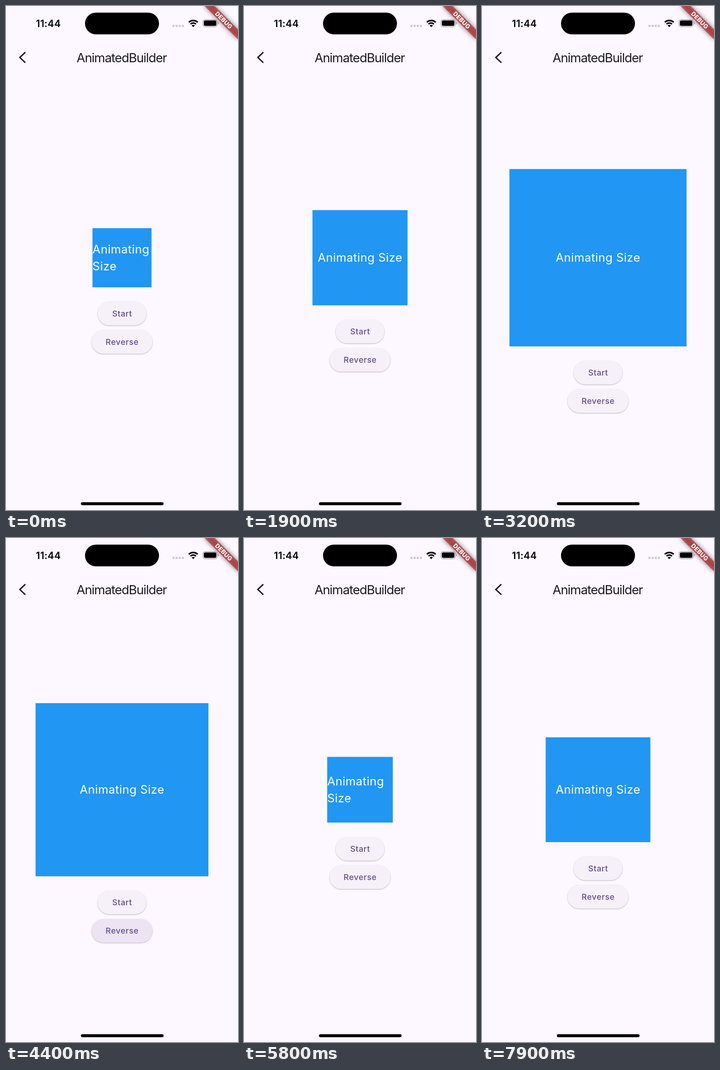
An HTML page for the animation above (8000 ms loop, 508 px wide and 1102 px high).

```html
<!DOCTYPE html>
<html lang="en">
<head>
<meta charset="utf-8">
<title>Animated size</title>
<style>
  html, body { margin: 0; width: 100%; height: 100%; overflow: hidden; background: #fdf7ff; }
  svg { display: block; width: 100vw; height: 100vh; }
  text { font-family: Inter, Roboto, sans-serif; font-optical-sizing: none; text-anchor: middle; }
  .title { font-size: 27.6px; letter-spacing: -1.15px; fill: #1d1b20; }
  .clock { font-size: 21.4px; font-weight: 600; letter-spacing: .2px; }
  .label { font-size: 25.4px; letter-spacing: .5px; fill: #fff; }
  .label.left { text-anchor: start; }
  .button text { font-size: 17.7px; font-weight: 500; letter-spacing: .6px; fill: #5f4e8c; }
  .face { fill: #f6f0f8; filter: drop-shadow(0 1.4px 1.2px rgba(0, 0, 0, .28)); }
  .ink { fill: #6750a4; }
  .banner { font-size: 13.2px; font-weight: 800; letter-spacing: .3px; fill: #fff; }
</style>
</head>
<body>
<svg viewBox="0 0 508 1102">
  <rect width="508" height="1102" fill="#fdf7ff"/>

  <!-- status bar -->
  <text class="clock" x="92.7" y="46">11:44</text>
  <rect x="173" y="14.5" width="162" height="47.5" rx="23.75"/>
  <path d="M366.8 43.5h21" stroke="#cfc8d2" stroke-width="5" stroke-linecap="round" stroke-dasharray="0 6.8"/>
  <g fill="none" stroke="#000" stroke-width="3.4">
    <path d="M400.3 35.6a14 14 0 0 1 19.4 0"/>
    <path d="M404 39.6a8.6 8.6 0 0 1 12 0"/>
  </g>
  <path d="M410 46.2l-3.5-3.6a5 5 0 0 1 7 0z"/>
  <rect x="431.2" y="29.6" width="31.4" height="16" rx="5" fill="none" stroke="#a39fa5" stroke-width="1.3"/>
  <rect x="433.2" y="31.6" width="27.4" height="12" rx="3.3"/>
  <path d="M464.2 35v5.4q2-.8 2-2.7t-2-2.7z" fill="#a39fa5"/>

  <!-- corner banner -->
  <g transform="translate(508) rotate(45)">
    <rect x="-51.7" y="36.2" width="103.4" height="15.5" fill="#000" opacity=".5" style="filter: blur(5.1px)"/>
    <rect x="-51.7" y="36.2" width="103.4" height="15.5" fill="#b71c1c" opacity=".627"/>
    <text class="banner" y="48.7">DEBUG</text>
  </g>

  <!-- app bar -->
  <path d="M42.3 101.2L30.3 112.6L42.3 124" fill="none" stroke="#1d1b20" stroke-width="3"/>
  <text class="title" x="253.2" y="123">AnimatedBuilder</text>

  <!-- resizing square -->
  <rect id="square" fill="#2196f3"/>
  <text id="oneLine" class="label" x="254.2" y="559">Animating Size</text>
  <g id="twoLines">
    <text class="label left" y="540.5">Animating</text>
    <text class="label left" y="577.5">Size</text>
  </g>

  <g id="buttons"></g>
  <rect x="164" y="1085" width="181" height="6.6" rx="3.3"/>
</svg>

<script>
const LOOP = 8000, STEP = 100, RUN = 2000, PRESS = 120;
const CENTER = { x: 254, y: 550.4 };
const SMALL = 129.26, LARGE = 387.8, WRAP = 187;
const taps = [
  { at: 1134, button: 0 },
  { at: 4132, button: 1 },
  { at: 7033, button: 0 }
];

const $ = id => document.getElementById(id);
const clamp = v => Math.max(0, Math.min(1, v));
const mix = (a, b, k) => a + (b - a) * k;
const setAll = (el, attrs) => {
  for (const key in attrs) el.setAttribute(key, attrs[key]);
};

// cubic-bezier(.42, 0, .58, 1)
function easeInOut(x) {
  if (x <= 0 || x >= 1) return clamp(x);
  let lo = 0, hi = 1;
  for (let i = 0; i < 30; i++) {
    const s = (lo + hi) / 2, r = 1 - s;
    if (1.26 * r * r * s + 1.74 * r * s * s + s ** 3 < x) lo = s;
    else hi = s;
  }
  return lo * lo * (3 - 2 * lo);
}

function makeButton(name, width, y, id) {
  const box = `x="${-width / 2}" y="-25.85" width="${width}" height="51.7" rx="25.85"`;
  $("buttons").insertAdjacentHTML("beforeend", `
    <g class="button" transform="translate(${CENTER.x} ${y})">
      <clipPath id="clip${id}"><rect ${box}/></clipPath>
      <rect class="face" ${box}/>
      <g class="ink" clip-path="url(#clip${id})"><rect ${box}/><circle/></g>
      <text x=".3" y="6.4">${name}</text>
    </g>`);
  const ink = $("buttons").lastElementChild.querySelector(".ink");
  return { glow: ink.children[0], ripple: ink.children[1], reach: Math.hypot(width / 2, 25.85) };
}

const buttons = [makeButton("Start", 107, 57.3, 0), makeButton("Reverse", 133.5, 119.3, 1)];

function drawInk(button, age) {
  const since = age - PRESS;
  const held = Math.min(age, PRESS) / 2000;
  const spread = since < 0 ? held : mix(held, 1, easeInOut(since / 225));
  const fade = clamp(age / 75) * (1 - clamp((since - 225) / 150));
  const glow = clamp(Math.min(age, PRESS) / 200) * (1 - clamp(since / 200));
  setAll(button.glow, { opacity: 0.1 * glow });
  setAll(button.ripple, {
    cx: mix(-11.5, 0, spread),
    cy: mix(10, 0, spread),
    r: mix(0.3 * button.reach, button.reach + 6, spread),
    opacity: 0.1 * fade
  });
}

function growth(t) {
  const last = taps.filter(tap => tap.at <= t).pop();
  if (!last) return 0;
  const k = easeInOut((t - last.at) / RUN);
  return last.button ? 1 - k : k;
}

function draw(t) {
  const size = mix(SMALL, LARGE, growth(t));
  const left = CENTER.x - size / 2;
  setAll($("square"), { x: left, y: CENTER.y - size / 2, width: size, height: size });

  const wrapped = size < WRAP;
  setAll($("oneLine"), { visibility: wrapped ? "hidden" : "visible" });
  setAll($("twoLines"), {
    visibility: wrapped ? "visible" : "hidden",
    transform: `translate(${left})`
  });

  setAll($("buttons"), { transform: `translate(0 ${CENTER.y + size / 2})` });
  buttons.forEach((button, i) => {
    const tap = taps.filter(p => p.button === i && p.at - PRESS <= t).pop();
    drawInk(button, tap ? t - tap.at + PRESS : 0);
  });
}

function tick() {
  const t = performance.now() % LOOP;
  draw(Math.floor(t / STEP) * STEP);
  requestAnimationFrame(tick);
}
tick();
</script>
</body>
</html>
```
